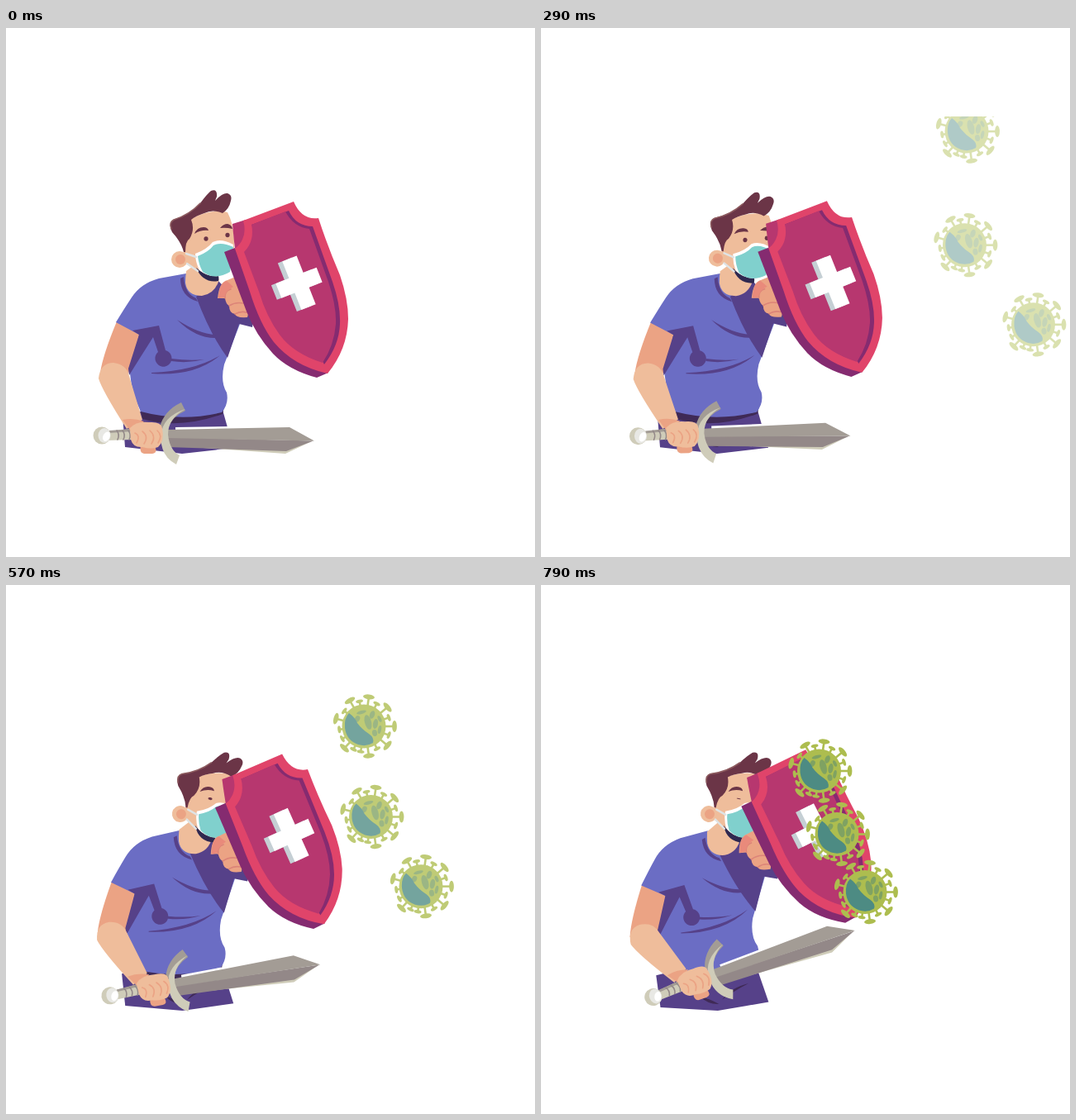
An HTML page for the animation above (1430 ms loop, 640 by 640 pixels).

```html
<!DOCTYPE html>
<html lang="en">
<head>
<meta charset="utf-8">
<title>Shield against the virus</title>
<style>
html, body { margin: 0; height: 100%; overflow: hidden; background: #fff; }
svg { display: block; width: 100vw; height: 100vh; }
.shirt { fill: #6b6dc4 }
.deep { fill: #564189 }
.belt { fill: #3f2a56 }
.skin { fill: #efbd9b }
.tan { fill: #eba384 }
.hair { fill: #6b3547 }
.rim { fill: #e0446a }
.face { fill: #b7376f }
.plum { fill: #852b70 }
.steel { fill: #a39c95 }
.iron { fill: #938888 }
.bone { fill: #cfccb9 }
.teal { fill: #80d0cd }
.line { fill: none; stroke-linecap: round; stroke-width: 1.6 }
</style>
</head>
<body>
<svg viewBox="0 0 640 640">
  <defs>
    <clipPath id="sky"><path d="M0 107H640V640H0Z"/></clipPath>
    <g id="virus"></g>
    <path id="plus" d="M-9.300-31.500H9.300V-9.500H26.500V9.500H9.300V31.500H-9.300V9.500H-26.500V-9.500H-9.300Z"/>
  </defs>

  <g id="hips">
    <path class="deep" d="M141 468L163 464L262 462L275 508L213 515L144 507Z"/>
    <path class="belt" d="M219 502Q230 488 252 484Q234 492 219 502ZM193 497Q204 500 215 507Q202 507 193 497Z"/>
  </g>

  <g id="torso">
    <path class="belt" d="M162 460L264 458L262 467Q210 486 165 473Z"/>
    <path class="tan" d="M134 355L162 369L148 418L114 417Q117 396 134 355Z"/>
    <path class="shirt" d="M218 297L185 303Q163 309 152 326Q144 338 133 356L161 371L150 418Q152 442 163 464Q212 477 261 465Q270 454 267 441Q259 428 264 407L283 358L276 335L256 305Z"/>
    <path class="deep" d="M230 325L256 305L275 325L300 345L298 362L282 358L268 399Q247 371 230 325Z"/>
    <path class="deep" d="M153 366L185 360L193 390A10 10 0 1 1 184 392L178 374Q164 396 149 420L148 412L161 371Z"/>
    <path class="deep" d="M207 353Q233 370 253 371L255 375Q230 376 207 353ZM200 400Q222 403 240 401Q220 406 200 403ZM176 417Q228 415 259 396Q228 422 176 418Z"/>
    <g id="neck">
      <path class="deep" d="M211 303Q211 325 232 331L230 327Q216 321 215 301Z"/>
      <path class="skin" d="M218 294Q217 302 217 308Q219 324 237 324Q253 322 258 304L232 284Z"/>
    </g>
  </g>

  <g id="head">
    <path class="skin" d="M214 262L224 231Q248 218 268 223Q277 240 276 265L270 300Q245 306 232 294L216 283Z"/>
    <path class="hair" d="M215 271Q212 259 201 247Q196 237 202 232Q222 226 235 212Q243 201 248 197Q256 194 255 204L253 209Q262 199 268 200Q274 202 272 209Q270 219 262 224Q250 219 240 224Q230 227 224 232Q229 244 222 255Q217 258 217 271Z"/>
    <path class="line" stroke="#8d5b5f" d="M200 243Q197 235 203 232Q222 226 235 212"/>
    <path fill="#2f2850" d="M230 290Q243 302 258 300L257 306Q238 309 230 290Z"/>
    <path class="hair" d="M228 249Q231 241 239 241Q244 241 245 245Q236 244 228 249ZM259 242Q263 237 268 237Q273 238 274 243Q266 241 259 242Z"/>
    <ellipse class="hair eye" cx="242" cy="255" rx="2.6"/>
    <ellipse class="hair eye" cx="268" cy="250.500" rx="2.6"/>
    <path fill="#fff" d="M229 273Q243 268 250 259Q260 254 275 262L275 304Q267 307 258 304L257 300Q243 301 234 293Q229 283 229 273Z"/>
    <path class="teal" d="M232 276Q245 271 251 263Q260 258 275 265L271 295Q253 306 238 295Q233 286 232 276Z"/>
    <circle class="skin" cx="210" cy="280" r="10"/>
    <circle class="tan" cx="211" cy="280" r="6"/>
    <path class="line" stroke="#dfe3e4" style="stroke-width:2.4" d="M218 273L230 277M219 285L232 294"/>
  </g>

  <g id="shield">
    <path class="tan" d="M268 305Q258 307 256 327L265 327Q266 334 270 336Q270 345 277 346Q278 351 292 350L300 320L280 300Z"/>
    <path class="line" stroke="#dc8478" d="M265 327Q264 318 272 316M270 336Q278 331 287 333M277 346Q284 342 291 344"/>
    <path fill="#e98a7b" d="M267 306Q258 308 257 327L264 326Q266 317 275 313Z"/>
    <path class="plum" d="M264 271L277 266L390 417L376 423Q342 414 323 394Q302 371 291 343Z"/>
    <path class="face" d="M274 237L290 232L298 255L277 267Q275 250 274 237Z"/>
    <path class="rim" d="M287 233L348 210Q358 233 378 230Q389 264 404 299Q414 328 414 352Q413 389 389 418Q348 409 324 380Q307 358 295 319L277 267Q293 254 287 233Z"/>
    <path class="plum" d="M297 238L342 221Q351 240 371 240L395 307Q405 336 404 358Q403 384 385 407Z"/>
    <path class="face" d="M297 238L338 222Q348 241 367 243L390 307Q400 337 399 358Q397 384 383 405Q348 394 331 371Q315 349 306 319L288 271Q301 258 297 238Z"/>
    <use href="#plus" fill="#c5cfd4" transform="translate(349 310.300) rotate(-21.500)"/>
    <use href="#plus" fill="#fff" transform="translate(354.500 308.300) rotate(-21.500)"/>
  </g>

  <g id="arm">
    <path class="bone" d="M122 488L152 485L152 498L122 499Z"/>
    <path class="steel" d="M125 487L152 485V488L125 490Z"/>
    <path class="line" stroke="#938888" d="M134 487Q138 492 135 498M141 487Q145 492 142 498M148 487Q152 492 149 498"/>
    <circle class="bone" cx="116" cy="493" r="10.500"/>
    <ellipse fill="#e8e8e4" cx="119" cy="493" rx="7.500" ry="9"/>
    <ellipse fill="#fff" cx="121.500" cy="494" rx="4" ry="6" transform="rotate(25 121 494)"/>
    <path fill="#fff" d="M205 483L343 481L344 485L205 488Z"/>
    <path class="bone" d="M197 505L338 515L372 499L340 511Z"/>
    <path class="iron" d="M195 495L372 499.500L339 512L195 507Z"/>
    <path class="steel" d="M195 486L343 483L373 499.500L195 496Z"/>
    <path class="steel" d="M212 453L217 463Q201 470 195 485L186 483Q191 463 212 453Z"/>
    <path class="bone" d="M217 461Q196 472 196 492Q198 511 210 517L206 528Q187 518 187 494Q189 470 217 461Z"/>
    <path class="tan" d="M163 505L180 506Q184 514 177 515H167Q161 514 163 505Z"/>
    <path class="skin" d="M112 424Q114 405 130 405Q146 407 149 421L165 474L146 485Q116 438 112 424Z"/>
    <path class="tan" d="M141 474Q154 471 167 476L151 488Z"/>
    <path class="skin" d="M150 484Q158 475 173 477Q188 476 189 484Q192 500 184 507Q176 510 165 507Q154 508 151 498Z"/>
    <path class="line" stroke="#eba384" d="M156 490Q163 493 158 502M165 488Q173 494 167 503M174 487Q182 494 176 503M183 487Q190 493 184 502"/>
  </g>

  <g clip-path="url(#sky)" id="swarm">
    <use href="#virus"/><use href="#virus"/><use href="#virus"/>
  </g>
</svg>
<script>
const $ = id => document.getElementById(id);
const set = (el, name, value) => el.setAttribute(name, value);

// Virus: spikes with caps around a ball
const GREEN = '#adbd4f';
const spike = (angle, reach, w, h) =>
  `<g transform="rotate(${angle})"><path d="M22-1.300H${reach}V1.300H22Z"/>` +
  `<ellipse cx="${reach}" rx="${w}" ry="${h}"/></g>`;
const big = [-82, -40, 0, 40, 82, 133, 195, 240];
const small = [-102, -62, -20, 20, 61, 99, 116, 151, 173, 217];
const spots = [[-4, -17, 6, 2, -15], [9, -14, 3, 5, 20], [4, -5, 4, 9, -15], [-9, -9, 3, 4, 30],
  [13, -3, 3, 6, 10], [18, 4, 2, 5, 12], [12, 8, 3, 4, -10], [18, -9, 2, 4, -25]];
$('virus').innerHTML = `<g fill="${GREEN}">` +
  big.map(a => spike(a, 36, 2.9, 7)).join('') +
  small.map(a => spike(a, 31, 2, 4.5)).join('') +
  '<circle cx="-1" r="26.500"/></g><g fill="#7fa262">' +
  spots.map(([x, y, rx, ry, a]) =>
    `<ellipse rx="${rx}" ry="${ry}" transform="translate(${x} ${y}) rotate(${a})"/>`).join('') +
  '</g><path fill="#4d8b83" d="M-19-16Q-12-11-9-4Q-3 4 5 9Q12 14 10 20Q2 25-8 22Q-22 17-24 2Q-25-10-19-16Z"/>';

// Final position and distance travelled of each virus
const flights = [[337.500, 225, 193, -108], [359, 301.500, 167, -42], [393, 371.500, 220, -13.700]];
const LOOP = 1430, LAST = 11;
const push = [0, .004, .012, .037, .075, .117, .17, .31, .5, .68, .85, 1];
const startOf = k => Math.round(k * 7.14) * 10;
const ease = x => { x = Math.min(1, x); return x * x * (3 - 2 * x); };

function draw(now) {
  const t = now % LOOP;
  let k = LAST;
  while (startOf(k) > t) k--;
  const s = push[k], nod = ease(k / 8.5);

  set($('hips'), 'transform', `rotate(${-3.3 * s} 215 500)`);
  set($('torso'), 'transform', `rotate(${-4.9 * s} 215 497)`);
  set($('neck'), 'transform', `translate(0 ${4 * s})`);
  set($('arm'), 'transform', `translate(${-5 * s} ${5 * s}) rotate(${-19.7 * s} 130 422)`);
  set($('head'), 'transform', `translate(${9 * nod - 16 * s} ${-3 * nod}) rotate(${11 * nod} 210 280)`);
  set($('shield'), 'transform', `translate(${-18.5 * s} ${-11.5 * s}) rotate(${-5.4 * s} 351 309)`);

  const open = Math.max(.2, Math.min(1, 1 - (k - 6) * .22));
  document.querySelectorAll('.eye').forEach(eye => set(eye, 'ry', 2.7 * open));

  [...$('swarm').children].forEach((virus, i) => {
    const [x, y, dx, dy] = flights[i];
    set(virus, 'transform', `translate(${x + dx * (1 - s)} ${y + dy * (1 - s)})`);
    set(virus, 'opacity', (k / LAST) ** .8);
  });
}

const begin = performance.now();
function tick() {
  draw(performance.now() - begin);
  requestAnimationFrame(tick);
}
tick();
</script>
</body>
</html>
```
